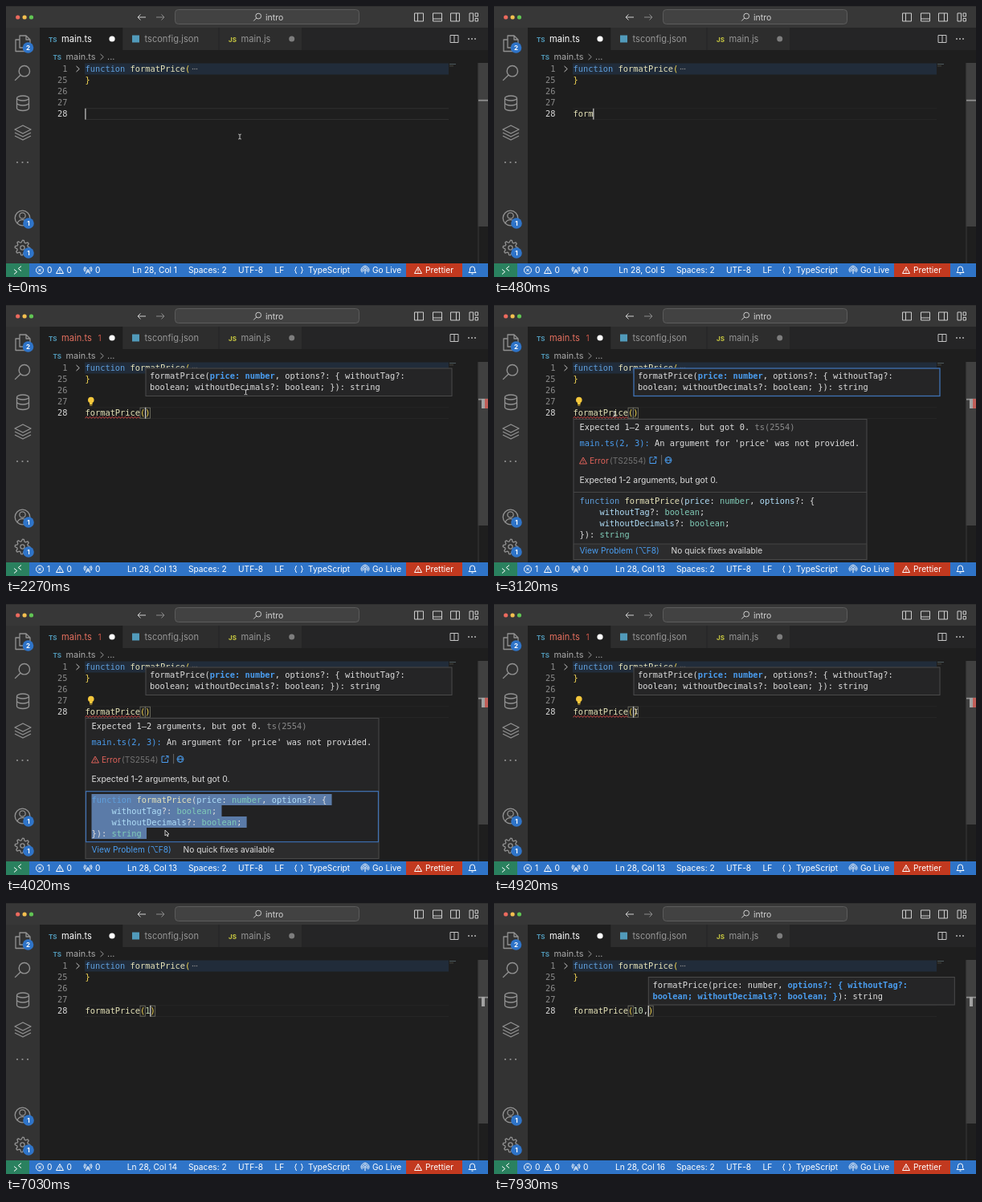
Write an HTML page with a canvas that moves like this. It is 600 by 338 pixels and loops after 8000 ms.

```html
<!DOCTYPE html>
<html lang="en">
<head>
<meta charset="utf-8">
<title>Editor</title>
<style>
html, body { margin: 0; width: 100%; height: 100%; overflow: hidden; background: #1e1e1e; }
canvas { display: block; width: 600px; height: 338px; }
</style>
</head>
<body>
<canvas id="stage"></canvas>
<script>
const W = 600, H = 338, LOOP = 8000;
const canvas = document.getElementById('stage');
const ctx = canvas.getContext('2d');
const dpr = window.devicePixelRatio || 1;
canvas.width = W * dpr;
canvas.height = H * dpr;

const MONO = '"DejaVu Sans Mono", monospace';
const SANS = 'Inter, sans-serif';
const CODE = `10.35px ${MONO}`, BOLD = `bold 10.35px ${MONO}`, UI = `10.2px ${SANS}`;
const CHAR = 6.23, LEFT = 98.5, ROW = 134.3;

const BLUE = '#2f74c8', LINK = '#4a9df0', RED = '#e0625a', FG = '#dedede', GREY = '#8a8a8a';
const KEY = '#5f9fdc', FN = '#e6e3b8', VAR = '#b0def8', TYPE = '#80ccb8', GOLD = '#f7da55';

const rect = (x, y, w, h, c) => { ctx.fillStyle = c; ctx.fillRect(x, y, w, h); };
const frame = (x, y, w, h, c, lw = 1) => {
  ctx.strokeStyle = c; ctx.lineWidth = lw; ctx.strokeRect(x, y, w, h);
};
const dot = (x, y, r, c) => {
  ctx.fillStyle = c; ctx.beginPath(); ctx.arc(x, y, r, 0, 7); ctx.fill();
};
const ring = (x, y, r, c, lw = 1) => {
  ctx.strokeStyle = c; ctx.lineWidth = lw; ctx.beginPath(); ctx.arc(x, y, r, 0, 7); ctx.stroke();
};
const text = (s, x, y, c = FG, font = UI, align = 'left') => {
  ctx.font = font; ctx.fillStyle = c; ctx.textAlign = align; ctx.fillText(s, x, y + 3.6);
};
// Icon outline given as path data around its own centre.
const icon = (d, x, y, c, lw = 1, fill) => {
  ctx.save();
  ctx.translate(x, y);
  ctx.lineWidth = lw; ctx.lineJoin = 'round'; ctx.strokeStyle = c;
  const p = new Path2D(d);
  if (fill) { ctx.fillStyle = fill; ctx.fill(p); }
  ctx.stroke(p);
  ctx.restore();
};
// Runs of [text, colour, font?] on a character grid.
const code = (x, y, runs) => {
  for (const [s, c, font = CODE] of runs) {
    text(s, x, y, c, font);
    x += s.length * CHAR;
  }
};

const CHEVRON = 'M-2 -3.5 L1.8 0 L-2 3.5';
const WARN = 'M0 -4 L4.5 4 H-4.5 Z M0 -1.3 V1.4 M0 2.2 V3';
const ANTENNA = 'M-1 0 A1 1 0 1 1 1 0 A1 1 0 1 1 -1 0 M0 1 V5 M-2.2 2 A3 3 0 1 1 2.2 2 M-3.6 3 A4.7 4.7 0 1 1 3.6 3';
const TOWER = 'M0 -1 L-2.6 4.5 M0 -1 L2.6 4.5 M-1.5 2.3 H1.5 M-2 -3.5 A3 3 0 0 0 -2 1 M2 -3.5 A3 3 0 0 1 2 1 M-3.7 -4.4 A5 5 0 0 0 -3.7 2 M3.7 -4.4 A5 5 0 0 1 3.7 2';

function search(x, y, r, c, lw) {
  ring(x + r * .35, y - r * .35, r, c, lw);
  const k = r * .36;
  icon(`M${-k} ${k} L${-r * 1.4} ${r * 1.4}`, x, y, c, lw);
}

function badge(x, y, s) {
  dot(x, y, 6.8, BLUE);
  text(s, x, y - .6, '#fff', `bold 8px ${SANS}`, 'center');
}

function titleBar() {
  rect(0, 0, W, 27, '#373737');
  rect(0, 0, W, 1, '#2e2e2e');
  ['#ec6a5e', '#f4bf4f', '#61c554'].forEach((c, i) => dot(14.7 + i * 8.4, 14, 2.6, c));
  icon('M5 0 H-5 M-1.5 -3.5 L-5 0 L-1.5 3.5', 169, 14, '#d0d0d0');
  icon('M-5 0 H5 M1.5 -3.5 L5 0 L1.5 3.5', 192, 14, '#8c8c8c');
  ctx.beginPath();
  ctx.roundRect(210.5, 4.5, 229, 18, 4);
  ctx.fillStyle = '#424242'; ctx.fill();
  ctx.strokeStyle = '#5c5c5c'; ctx.lineWidth = 1; ctx.stroke();
  search(313, 13.8, 3.4, '#ccc', 1);
  text('intro', 323, 14, '#d2d2d2', `10.5px ${SANS}`);
  const box = 'M-5.5 -5 H5.5 V5 H-5.5 Z ';
  icon(box + 'M-1.5 -5 V5', 514, 14, '#ccc');
  icon(box + 'M-5.5 2 H5.5', 537, 14, '#ccc');
  icon(box + 'M1.5 -5 V5', 559, 14, '#ccc');
  icon('M-5 -5 H-.5 V5 H-5 Z M2 -5 H5.5 V-1 H2 Z M2 1.5 H5.5 V5 H2 Z', 582, 14, '#ccc');
}

function activityBar() {
  rect(0, 27, 42, 294, '#333');
  const c = '#929292';
  icon('M-4 -10 H4 L9 -5 V5 H-4 Z M4 -10 V-5 H9 M-4 -5 H-9 V9.5 H4 V5', 21, 47, c, 1.3);
  badge(27.5, 52, '2');
  search(20.5, 83.5, 6.7, c, 1.4);
  icon('M-7.5 -6 A7.5 3 0 0 1 7.5 -6 A7.5 3 0 0 1 -7.5 -6 V6.5 A7.5 3 0 0 0 7.5 6.5 V-6 M-7.5 0 A7.5 3 0 0 0 7.5 0', 21, 121, c, 1.3);
  icon('M0 -9 L10 -4 L0 1 L-10 -4 Z M-10 0 L0 5 L10 0 M-10 4 L0 9 L10 4', 21, 158, c, 1.3);
  for (let i = -1; i < 2; i++) dot(20.5 + i * 6.5, 195, 1.1, c);
  ring(20.5, 264.5, 9.3, c, 1.3);
  ring(20.5, 261.5, 3.7, c, 1.3);
  icon('M-6.5 6.5 A7 7 0 0 1 6.5 6.5', 20.5, 264.5, c, 1.3);
  badge(28, 271, '1');
  let gear = '';
  for (let i = 0; i < 32; i++) {
    const a = i * Math.PI / 16, r = i % 4 < 2 ? 9.3 : 6.8;
    gear += `${i ? 'L' : 'M'}${r * Math.cos(a)} ${r * Math.sin(a)} `;
  }
  icon(gear + 'Z', 20.5, 301.5, c, 1.3);
  ring(20.5, 301.5, 2.6, c, 1.3);
  badge(28, 308, '1');
}

function tabs(err) {
  const tag = `bold 8px ${SANS}`, label = `11.1px ${SANS}`;
  rect(42, 27, 558, 28, '#252526');
  rect(42, 27, 103, 28, '#1e1e1e');
  rect(145.5, 27, 119, 28, '#2d2d2d');
  rect(265.5, 27, 102.5, 28, '#2d2d2d');
  text('TS', 53, 41, '#519aba', tag);
  text('main.ts', 69, 41.4, err ? '#e5705f' : '#fff', label);
  if (err) text('1', 114.5, 41.4, '#c95548', UI);
  dot(132, 41, 3.6, '#fff');
  rect(157, 36.5, 9, 9, '#519aba');
  text('tsconfig.json', 172.5, 41.4, '#969696', label);
  text('JS', 277, 41, '#cbcb41', tag);
  text('main.js', 292.5, 41.4, '#969696', label);
  dot(355.7, 41, 3.5, '#7d7d7d');
  icon('M-5 -4.5 H5 V4.5 H-5 Z M0 -4.5 V4.5', 558, 41, '#c5c5c5');
  for (let i = -1; i < 2; i++) dot(580 + i * 4, 41, .9, '#c5c5c5');
  text('TS', 58.5, 63, '#519aba', tag);
  text('main.ts', 74.5, 63.3, '#a9a9a9', `10.9px ${SANS}`);
  icon(CHEVRON, 119.5, 63.5, '#999');
  text('...', 126, 63.3, '#a9a9a9', `10.9px ${SANS}`);
}

function statusBar(s) {
  const y = 329.5, c = '#fff';
  rect(0, 321, W, 17, BLUE);
  rect(0, 321, 29, 17, '#2a815f');
  icon('M-4.5 -1 L-.8 2 L-4.5 5 M4.5 -5 L.8 -2 L4.5 1', 14.5, y, c);
  ring(42, y, 4.5, c);
  icon('M-1.8 -1.8 L1.8 1.8 M1.8 -1.8 L-1.8 1.8', 42, y, c);
  text(s.err ? '1' : '0', 51, y, c);
  icon(WARN, 67, y, c);
  text('0', 75.5, y, c);
  icon(TOWER, 102, y, c);
  text('0', 111, y, c);
  text(`Ln 28, Col ${s.typed.length + 1}`, 213, y, c, UI, 'right');
  text('Spaces: 2', 227, y, c);
  text('UTF-8', 289, y, c);
  text('LF', 334.5, y, c);
  icon('M-2.5 -4 Q-4 -4 -4 -2.2 Q-4 0 -5 0 Q-4 0 -4 2.2 Q-4 4 -2.5 4 M2.5 -4 Q4 -4 4 -2.2 Q4 0 5 0 Q4 0 4 2.2 Q4 4 2.5 4', 364.5, y, c);
  text('TypeScript', 376, y, c);
  icon(ANTENNA, 447, y - .3, c);
  text('Go Live', 456, y, c);
  rect(498, 321, 70, 17, '#c2391f');
  icon(WARN, 513, y, c);
  text('Prettier', 522, y, c);
  icon('M-4.5 3 L-3 1 V-1.5 A3 3 0 0 1 3 -1.5 V1 L4.5 3 Z M-1 4.6 H1', 580.5, y, c);
}

function editor(s) {
  rect(42, 55, 558, 266, '#1e1e1e');
  rect(98, 71.5, 453, 14, '#212c3a');
  ['1', '25', '26', '27', '28'].forEach((n, i) =>
    text(n, 76.5, 78 + i * 14, i === 4 ? '#dadada' : '#8a8a8a', CODE, 'right'));
  icon(CHEVRON, 89.5, 78.5, '#c5c5c5');
  code(LEFT, 78, [['function ', KEY], ['formatPrice', FN], ['(', GOLD]]);
  for (let i = 0; i < 3; i++) dot(232.5 + i * 2.5, 78.5, .75, '#8c8c8c');
  code(LEFT, 92, [['}', GOLD]]);

  const edge = s.typed ? '#262626' : '#303030';
  rect(98, 127.3, 453, 1, edge);
  rect(98, 141, 453, 1, edge);

  const caret = LEFT + s.typed.length * CHAR;
  const open = s.typed.length > 11;
  if (open) {
    for (const x of [LEFT + 11 * CHAR, caret]) frame(x, 128.2, CHAR, 13, '#757568', .8);
  }
  code(LEFT, ROW, [
    [s.typed.slice(0, 11), FN], [s.typed.slice(11, 12), GOLD],
    [s.typed.slice(12, 14), '#c0d6b2'], [s.typed.slice(14), FG], [open ? ')' : '', GOLD]
  ]);
  if (s.err) {
    let d = `M${LEFT} 141`;
    for (let x = 2; x <= 68; x += 2) d += ` L${LEFT + x} ${x % 4 ? 139.4 : 141.2}`;
    icon(d, 0, 0, '#f14c4c', .9);
  }
  if (s.bulb) {
    dot(105.8, 118.5, 3.8, '#f5c73c');
    rect(104, 121, 3.6, 3, '#f5c73c');
    rect(104.2, 124.6, 3.2, 1, '#d8b030');
  }
  if (s.caret) rect(caret - .2, 127.8, 1.2, 13.8, '#c8c8c8');

  // minimap and overview ruler
  rect(552, 72, 8, 1, '#4d5a5e');
  rect(552, 74.3, 5, 1, '#48483f');
  rect(587.5, 71, 12.5, 204, '#404040');
  rect(587.5, 71, 1, 250, '#383838');
  rect(588, 116.8, 12, 1.8, '#8f8f8f');
  if (s.ruler) rect(592, 117, 4, 12, '#a2a2a2');
  if (s.err) rect(596, 117, 4, 12, '#c05e58');
}

function hint(x, y, second, focus) {
  rect(x, y, 382, 35.5, '#252526');
  frame(x + .5, y + .5, 381, 34.5, focus ? '#3f72b4' : '#4a4a4a', focus ? 1.3 : 1);
  const hot = [LINK, BOLD], plain = [FG, CODE];
  const a = second ? plain : hot, b = second ? hot : plain;
  code(x + 5.6, y + 10, [['formatPrice(', FG], ['price: number', ...a], [', ', FG],
    ['options?: { withoutTag?:', ...b]]);
  code(x + 5.6, y + 24, [['boolean; withoutDecimals?: boolean; }', ...b], ['): string', FG]]);
}

const SIGNATURE = [
  [['function ', KEY], ['formatPrice', FN], ['(', FG], ['price', VAR], [': ', FG], ['number', TYPE],
    [', ', FG], ['options', VAR], ['?: {', FG]],
  [['    withoutTag', VAR], ['?: ', FG], ['boolean', TYPE], [';', FG]],
  [['    withoutDecimals', VAR], ['?: ', FG], ['boolean', TYPE], [';', FG]],
  [['}): ', FG], ['string', TYPE]]
];

function hover(s) {
  const x = 106.5;
  rect(98.5, 142, 366, 176, '#252526');
  rect(98.5, 298, 366, 20, '#2c2c2d');
  frame(99, 142.5, 365, 175, '#484848');
  code(x, 152.5, [['Expected 1–2 arguments, but got 0.', FG], [' ts(2554)', GREY]]);
  code(x, 172.6, [['main.ts(2, 3):', LINK], [" An argument for 'price' was not provided.", FG]]);
  icon(WARN, 111, 194, RED);
  text('Error', 119, 194, RED);
  text('(TS2554)', 144, 194, '#727272');
  icon('M-.5 -3.5 H-4 V4 H3.5 V.5 M1 -4 H4 V-1 M4 -4 L-.5 .5', 198, 193.5, LINK);
  text('|', 207, 193.5, '#777');
  ring(217, 193.5, 4, LINK, .9);
  icon('M-4 0 H4 M0 -4 A4.5 4.5 0 0 0 0 4 A4.5 4.5 0 0 0 0 -4', 217, 193.5, LINK, .8);
  text('Expected 1-2 arguments, but got 0.', x, 218, FG, `10.4px ${SANS}`);
  rect(99, 233, 365, 1, '#454545');
  if (s.select) {
    rect(99, 234, 365, 63, '#222223');
    const last = Math.max(0, Math.min(3, Math.floor((s.mouse[1] - 237) / 14)));
    SIGNATURE.slice(0, last + 1).forEach((runs, i) => {
      // the line break counts as one more selected column
      const full = runs.reduce((n, r) => n + r[0].length, 1) * CHAR;
      const w = i < last ? full : Math.max(0, Math.min(full, s.mouse[0] - x));
      rect(x, 237 + i * 14, w, 14, '#5b7ba8');
    });
    frame(99.5, 233.7, 364, 63, '#3f72b4', 1.2);
  }
  SIGNATURE.forEach((runs, i) => code(x, 244.3 + i * 14, runs));
  if (!s.select) rect(99, 297.5, 365, 1, '#454545');
  text('View Problem (⌥F8)', x, 306.6, LINK);
  text('No quick fixes available', 220.5, 306.6, FG);
}

const PATH = [[0, 291, 163], [1900, 291, 163], [2400, 300, 98], [2950, 150, 136], [3490, 150, 136],
  [3660, 107, 244], [4000, 199, 285], [4280, 199, 285], [4860, 177, 134], [LOOP, 177, 134]];

function mouseAt(t) {
  const i = PATH.findIndex(p => p[0] > t);
  const [t0, x0, y0] = PATH[i - 1], [t1, x1, y1] = PATH[i];
  const u = (t - t0) / (t1 - t0), k = u * u * (3 - 2 * u);
  return [x0 + (x1 - x0) * k, y0 + (y1 - y0) * k];
}

function pointer([x, y], arrow) {
  if (arrow) icon('M0 -3 V4 L1.7 2.5 L3 5 L4 4.4 L2.9 2.2 L5 2 Z', x - 1, y, '#eee', .8, '#222');
  else icon('M-1.8 -3 Q0 -3 0 -2 V2 Q0 3 -1.8 3 M1.8 -3 Q0 -3 0 -2 M0 2 Q0 3 1.8 3', x, y, '#d8d8d8', .9);
}

function typedAt(t) {
  const call = 'formatPrice(';
  if (t < 1180) return call.slice(0, Math.max(0, Math.min(11, Math.floor((t - 180) / 70))));
  return call + '10,'.slice(0, [7000, 7200, 7770].filter(at => t >= at).length);
}

function stateAt(t) {
  const within = (a, b) => t >= a && t < b;
  return {
    typed: typedAt(t),
    err: within(1650, 5500),
    bulb: within(1740, 5500),
    ruler: t >= 1650,
    caret: !within(2400, 4880) && !within(6550, 6770),
    hint: within(1320, 5500),
    focus: within(2400, 3660),
    hover: within(3000, 4850),
    select: within(3660, 4850),
    nextHint: t >= 7860,
    mouse: mouseAt(t),
    pointer: t < 250 || within(1900, 5500),
    arrow: within(3560, 4800)
  };
}

function draw(t) {
  const s = stateAt(t);
  ctx.setTransform(dpr, 0, 0, dpr, 0, 0);
  editor(s);
  tabs(s.err);
  titleBar();
  activityBar();
  statusBar(s);
  if (s.hint) hint(173.5, 78.5, false, s.focus);
  if (s.nextHint) hint(191.8, 92, true, false);
  if (s.hover) hover(s);
  if (s.pointer) pointer(s.mouse, s.arrow);
}

const start = performance.now();
function tick() {
  draw((performance.now() - start) % LOOP);
  requestAnimationFrame(tick);
}
tick();
</script>
</body>
</html>
```
